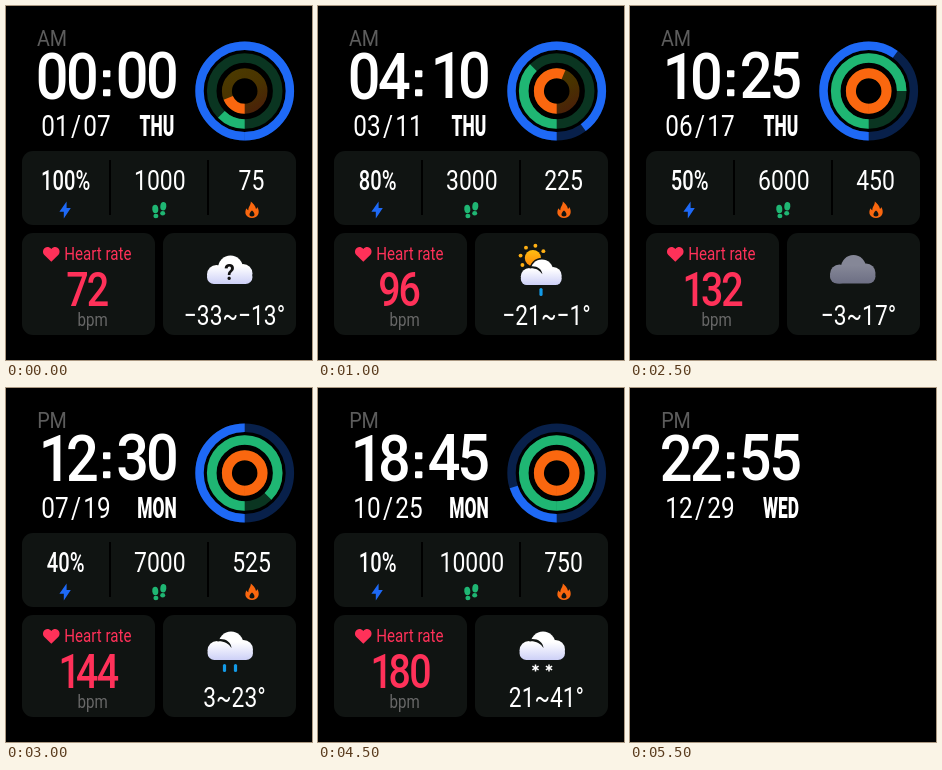
An HTML page with a canvas that plays this animation: 306x354 px, repeating every 6 s.

```html
<!DOCTYPE html>
<html lang="en">
<head>
<meta charset="utf-8">
<title>Watch face</title>
<style>
  html, body { margin: 0; width: 100%; height: 100%; overflow: hidden; background: #000; }
  canvas { display: block; width: 306px; height: 354px; }
</style>
</head>
<body>
<canvas id="face"></canvas>
<script>
const W = 306, H = 354, STEP = 500, STEPS = 12, AMBIENT = 10;
const BLUE = '#1e69f6', GREEN = '#1fb673', ORANGE = '#fa670f', RED = '#ff3159';
const CARD = '#101412', GRAY = '#5c5c5c', RAIN = '#139be8';
const DAYS = ['SUN', 'MON', 'TUE', 'WED', 'THU', 'FRI', 'SAT'];
const TAU = Math.PI * 2;

const canvas = document.getElementById('face');
const ctx = canvas.getContext('2d');
const dpr = window.devicePixelRatio || 1;
canvas.width = W * dpr;
canvas.height = H * dpr;

const pad = n => String(n).padStart(2, '0');
const signed = n => String(n).replace('-', '\u2212');

// Centred text in a condensed cut of Roboto; "ink" centres the visible glyph
function text(str, x, y, size, color = '#fff', weight = 400, cut = 0.84, ink = false) {
  ctx.save();
  ctx.translate(x, y);
  ctx.scale(cut, 1);
  ctx.font = `${weight} ${size}px Roboto, "Liberation Sans", sans-serif`;
  ctx.textAlign = 'center';
  ctx.fillStyle = color;
  const m = ctx.measureText(str);
  const shift = ink ? (m.actualBoundingBoxLeft - m.actualBoundingBoxRight) / 2 : 0;
  ctx.fillText(str, shift, 0);
  ctx.restore();
}

// Large numerals, each centred in a cell of equal width
function digits(str, x, y, size, pitch, color, cut) {
  [...str].forEach((c, k) =>
    text(c, x + (k - (str.length - 1) / 2) * pitch, y, size, color, 500, cut, true));
}

function box(x, y, w, h, r, color) {
  ctx.fillStyle = color;
  ctx.beginPath();
  ctx.roundRect(x, y, w, h, r);
  ctx.fill();
}

function dot(x, y, rx, color, ry = rx, tilt = 0) {
  ctx.fillStyle = color;
  ctx.beginPath();
  ctx.ellipse(x, y, rx, ry, tilt, 0, TAU);
  ctx.fill();
}

function shape(d, x, y, color) {
  ctx.save();
  ctx.translate(x, y);
  ctx.fillStyle = color;
  ctx.fill(new Path2D(d));
  ctx.restore();
}

// Progress ring that fills clockwise from the bottom
function ring(r, w, part, color, track) {
  const x = 238.7, y = 85, start = Math.PI / 2;
  ctx.lineWidth = w;
  ctx.strokeStyle = track;
  ctx.beginPath();
  ctx.arc(x, y, r, 0, TAU);
  ctx.stroke();
  ctx.strokeStyle = color;
  ctx.beginPath();
  ctx.arc(x, y, r, start, start + TAU * Math.min(part, 1));
  ctx.stroke();
}

function rings(i, steps, kcal) {
  const brown = ctx.createLinearGradient(228, 66, 250, 104);
  brown.addColorStop(0, '#4b3900');
  brown.addColorStop(0.5, '#493300');
  brown.addColorStop(1, '#4a2208');
  ring(45.2, 8.4, (11 - i) / 10, BLUE, '#08204a');
  ring(33, 9.6, steps / 8000, GREEN, '#0a3521');
  ring(17.8, 10, kcal / 400, ORANGE, brown);
}

function clock(i) {
  const hour = i * 2;
  text(hour < 12 ? 'AM' : 'PM', 46, 39.7, 21.5, GRAY, 400, 0.92);
  digits(pad(hour), 61.2, 92.6, 65.5, 30.4, '#fff', 0.88);
  digits(pad(i * 5), 141.2, 92, 65.5, 30.4, '#fff', 0.88);
  box(97, 64.3, 7.4, 7, 1, '#fff');
  box(97, 83.3, 7.4, 7, 1, '#fff');

  const day = 7 + i * 2;
  text(pad(i + 1), 49, 130, 29);
  text('/', 70, 130, 29);
  text(pad(day), 91, 130, 29);
  const weekday = new Date(2021, i, day).getDay();
  text(DAYS[weekday], 151, 130, 29, '#fff', 900, 0.6);
}

function feet(x, y) {
  dot(x - 4, y - 1, 3, GREEN, 4.2, -0.1);
  dot(x - 3.4, y + 6, 2.5, GREEN, 2.3);
  dot(x + 4, y - 3.8, 3, GREEN, 4.2, 0.1);
  dot(x + 3.4, y + 3.2, 2.5, GREEN, 2.3);
}

function stats(i, steps, kcal) {
  box(16, 145, 274, 74, 11, CARD);
  box(103, 154, 2, 55, 0, '#000');
  box(201, 154, 2, 55, 0, '#000');
  text(100 - i * 10 + '%', 59.7, 184, 28, '#fff', 500, 0.72);
  text(steps, 153.8, 184, 28, '#fff', 400, 0.82);
  text(kcal, 245.5, 184, 28, '#fff', 400, 0.82);
  shape('M1.6 -8.4L-5.6 1.8H-1.2V8.4L5.8 -1.9H1.6Z', 59, 204, BLUE);
  feet(153.3, 204);
  shape('M-1.2 -8.5C1 -6.4 3.6 -4.4 4 -1C4.8 -1.4 5.2 -2.3 5.3 -3C8.6 2.6 6 8 0 8' +
        'C-6 8 -8.2 3 -5.5 -1.7C-5 -.5 -4.4 0 -3.6 .2C-4 -3 -1 -5 -1.2 -8.5Z' +
        'M0 .6C-3.6 3.6 -3 6.6 0 6.6C3 6.6 3.6 3.6 0 .6Z', 246, 204, ORANGE);
}

function pulse(i) {
  box(16, 227, 133, 102, 11, CARD);
  shape('M0 7.8L-7.2 .7C-10.8 -4 -4.6 -10.4 0 -5C4.6 -10.4 10.8 -4 7.2 .7Z', 45.3, 248, RED);
  text('Heart rate', 91.8, 254, 18, RED);
  digits(String(72 + i * 12), 81.6, 300, 48, 20.6, RED, 0.82);
  text('bpm', 86.7, 320, 18, '#686868');
}

function cloud(x, y, scale = 1, top = '#fff', bottom = '#cdd0f7') {
  const fade = ctx.createLinearGradient(0, -4, 0, 14);
  fade.addColorStop(0, top);
  fade.addColorStop(1, bottom);
  ctx.save();
  ctx.translate(x, y);
  ctx.scale(scale, scale);
  dot(1, -2, 12.5, fade);
  dot(-13, 4.5, 9.5, fade);
  dot(13.5, 3.5, 9.5, fade);
  box(-22.5, 0, 45.5, 14, 7, fade);
  ctx.restore();
}

// White cloud with a dark curl above its left lobe
function curled(x, y, scale = 1) {
  cloud(x, y, scale);
  ctx.save();
  ctx.translate(x, y);
  ctx.scale(scale, scale);
  shape('M-14 -6.5C-6 -8.5 1 -5 1.5 2C-1.5 -3 -6 -5.2 -13 -4.8Z', 0, 0, CARD);
  ctx.restore();
}

function sun(x, y, r) {
  const glow = ctx.createLinearGradient(x, y - r, x, y + r);
  glow.addColorStop(0, '#ffbd12');
  glow.addColorStop(1, '#ff8a0a');
  dot(x, y, r, glow);
  for (let k = 0; k < 8; k++) {
    const a = k * TAU / 8 + 0.2;
    dot(x + Math.cos(a) * r * 1.55, y + Math.sin(a) * r * 1.55, r * 0.24, '#ffb014');
  }
}

function flake(x, y) {
  ctx.strokeStyle = '#fff';
  ctx.lineWidth = 1.5;
  ctx.beginPath();
  for (let k = 0; k < 3; k++) {
    const a = Math.PI / 2 + k * Math.PI / 3;
    const dx = Math.cos(a) * 3.6, dy = Math.sin(a) * 3.6;
    ctx.moveTo(x - dx, y - dy);
    ctx.lineTo(x + dx, y + dy);
  }
  ctx.stroke();
}

const drop = (x, y = 276) => box(x - 1.6, y, 3.2, 8, 1.6, RAIN);

// Sun behind a cloud, parted by a dark gap
function sunCloud(x, y, scale) {
  sun(x - 9 * scale, y - 16 * scale, 9 * scale);
  cloud(x, y, scale * 1.13, CARD, CARD);
  curled(x, y, scale);
}

const SKY = [
  () => {
    cloud(223.5, 264);
    text('?', 223.5, 274, 22, '#111', 700, 0.95);
  },
  () => sunCloud(225, 273.5, 1),
  () => { sunCloud(223, 266.5, 0.9); drop(223, 282); },
  () => { sunCloud(223, 266.5, 0.9); flake(223.3, 286.3); },
  () => sun(223.5, 264, 12),
  () => cloud(222.5, 263.5, 1, '#858797', '#6d6f84'),
  () => { curled(224, 258); drop(218.5); drop(229.5); },
  () => { curled(224, 258); flake(224, 280); },
  () => { curled(224, 258); drop(213.5); drop(224); drop(234.5); },
  () => { curled(224, 258); flake(217.5, 280); flake(231, 280); },
];

function weather(i) {
  box(157, 227, 133, 102, 11, CARD);
  SKY[i]();
  const low = -33 + i * 6;
  text(`${signed(low)}~${signed(low + 20)}\u00b0`, 228.5, 318.6, 28.5, '#fff', 400, 0.8);
}

function draw(now) {
  const i = Math.floor(now / STEP) % STEPS;
  ctx.setTransform(dpr, 0, 0, dpr, 0, 0);
  ctx.fillStyle = '#000';
  ctx.fillRect(0, 0, W, H);
  clock(i);
  if (i < AMBIENT) {
    const steps = (i + 1) * 1000, kcal = (i + 1) * 75;
    rings(i, steps, kcal);
    stats(i, steps, kcal);
    pulse(i);
    weather(i);
  }
}

const begin = performance.now();
function tick() {
  draw(performance.now() - begin);
  requestAnimationFrame(tick);
}
tick();
</script>
</body>
</html>
```
